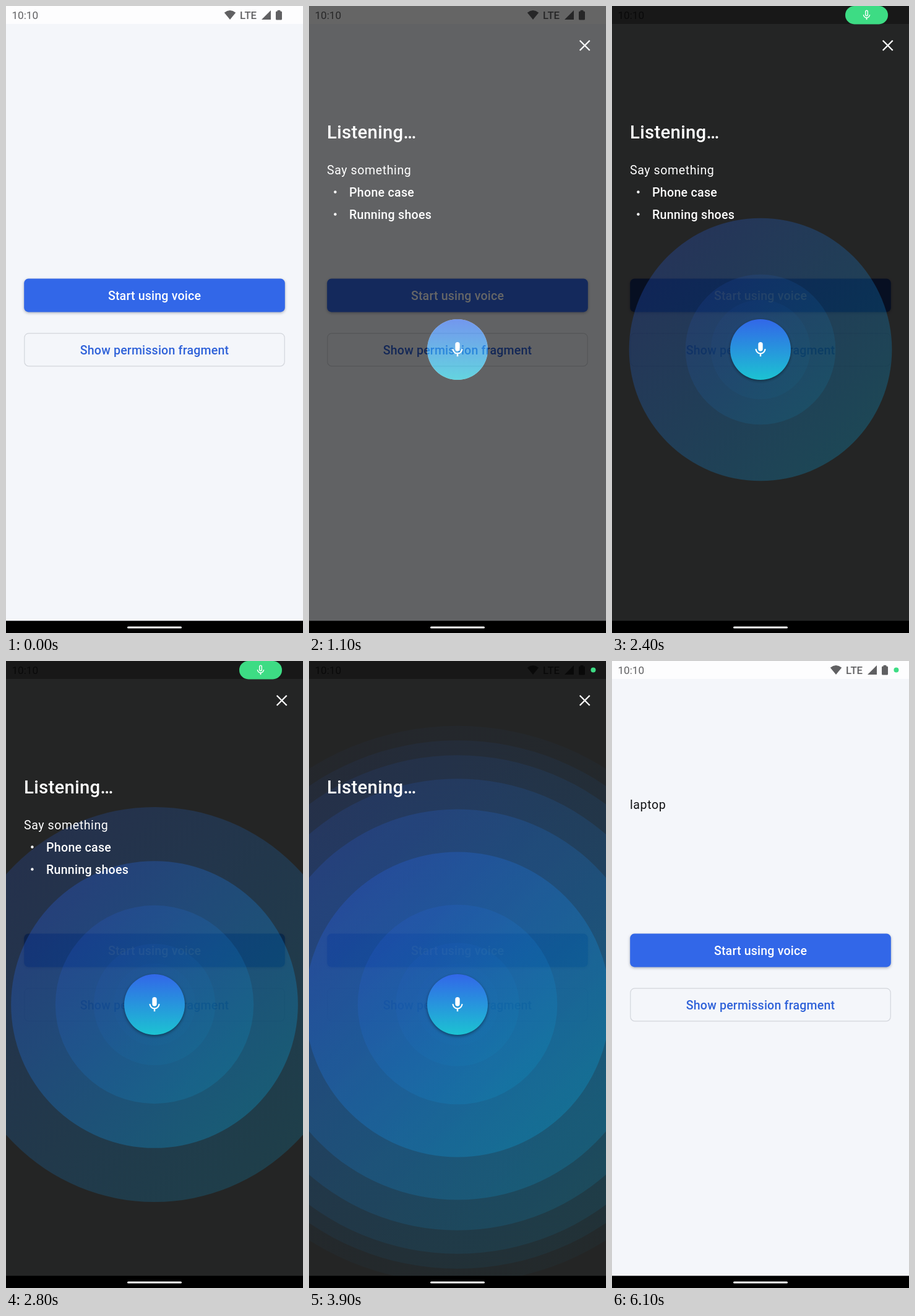
Recreate the animation shown at these times as an HTML page with a canvas. Size 480 px wide and 1013 px high, loop 6200 ms.

```html
<!DOCTYPE html>
<html lang="en">
<head>
<meta charset="utf-8">
<title>Voice input overlay</title>
<style>
  html, body { margin: 0; width: 100%; height: 100%; overflow: hidden; background: #000; }
  canvas { display: block; width: 480px; height: 1013px; }
</style>
</head>
<body>
<canvas id="stage"></canvas>
<script>
const W = 480, H = 1013, LOOP = 6200, STEP = 100;
const BLUE = '#3267e8', PAPER = '#f4f6fa', GREEN = '#3ddc84', GREY = '#606062';
const MIC = { x: 240, y: 555, r: 49 };
const RING_LIFE = 3900, RING_GROWTH = 430;
const RING_STARTS = [1212, 1547, 1790, 2068, 2328, 2597, 2886, 3159, 3430, 3700, 3970];

const canvas = document.getElementById('stage');
const ctx = canvas.getContext('2d');
const dpr = window.devicePixelRatio || 1;
canvas.width = W * dpr;
canvas.height = H * dpr;

const ramp = (t, a, b) => Math.min(1, Math.max(0, (t - a) / (b - a)));
const mix = (a, b, k) => a + (b - a) * k;
const smooth = k => k * k * (3 - 2 * k);

// cubic-bezier(.4, 0, .2, 1), solved by bisection
function fastOutSlowIn(x) {
  let lo = 0, hi = 1;
  for (let i = 0; i < 24; i++) {
    const s = (lo + hi) / 2, q = 1 - s;
    if (1.2 * q * q * s + 0.6 * q * s * s + s * s * s < x) lo = s; else hi = s;
  }
  return smooth(lo);
}

function text(str, x, y, { size = 19.56, weight = 400, color = '#fff', gap = 0, align = 'left' } = {}) {
  ctx.font = `${weight} ${size}px Roboto, sans-serif`;
  ctx.letterSpacing = gap + 'px';
  ctx.textAlign = align;
  ctx.fillStyle = color;
  ctx.fillText(str, x, y);
}

function disc(x, y, r, fill) {
  ctx.beginPath();
  ctx.arc(x, y, r, 0, Math.PI * 2);
  ctx.fillStyle = fill;
  ctx.fill();
}

function box(x, y, w, h, r) {
  ctx.beginPath();
  ctx.roundRect(x, y, w, h, r);
}

function poly(points, fill) {
  ctx.beginPath();
  points.forEach(([x, y]) => ctx.lineTo(x, y));
  ctx.closePath();
  ctx.fillStyle = fill;
  ctx.fill();
}

function withAlpha(alpha, draw) {
  ctx.save();
  ctx.globalAlpha *= alpha;
  draw();
  ctx.restore();
}

// Microphone on a 24 unit grid
function micIcon(x, y, scale, outlined) {
  ctx.save();
  ctx.translate(x, y);
  ctx.scale(scale, scale);
  ctx.translate(-12, -12);
  ctx.fillStyle = ctx.strokeStyle = '#fff';
  ctx.lineWidth = 1.7;
  if (outlined) {
    box(9.8, 2.8, 4.4, 10.4, 2.2);
    ctx.stroke();
  } else {
    box(9, 2, 6, 12, 3);
    ctx.fill();
  }
  ctx.beginPath();
  ctx.arc(12, 11, 6.15, 0, Math.PI);
  ctx.stroke();
  ctx.fillRect(11, 17, 2, 4);
  ctx.restore();
}

function outlineButton() {
  box(29.8, 528.8, 420.4, 53, 7);
  ctx.strokeStyle = '#d3d6dc';
  ctx.lineWidth = 1.2;
  ctx.stroke();
  text('Show permission fragment', 240, 563, { weight: 500, color: '#2f62d9', gap: 0.2, align: 'center' });
}

function filledButton() {
  ctx.save();
  ctx.shadowColor = 'rgba(30,40,70,.35)';
  ctx.shadowBlur = 4 * dpr;
  ctx.shadowOffsetY = 1.5 * dpr;
  box(29.2, 440.6, 421.6, 53.8, 7);
  ctx.fillStyle = BLUE;
  ctx.fill();
  ctx.restore();
  text('Start using voice', 240, 475, { weight: 500, gap: 0.2, align: 'center' });
}

function statusIcons() {
  ctx.beginPath();
  ctx.moveTo(362, 22);
  ctx.lineTo(352.8, 10.8);
  ctx.quadraticCurveTo(362, 3.4, 371.2, 10.8);
  ctx.closePath();
  ctx.fillStyle = GREY;
  ctx.fill();
  text('LTE', 378, 20.6, { size: 16.8, weight: 500, color: GREY });
  poly([[428, 7], [428, 22], [413, 22]], GREY);
  box(436, 8.5, 10, 14, 1.5);
  ctx.fill();
  ctx.fillRect(438.7, 6.8, 4.6, 2.5);
}

function page(t) {
  ctx.fillStyle = PAPER;
  ctx.fillRect(0, 0, W, H);
  ctx.fillStyle = '#fdfdfe';
  ctx.fillRect(0, 0, W, 29);
  text('10:10', 9.5, 21.3, { size: 17.1, color: GREY });
  if (t < 1700 || t >= 3000) statusIcons();
  if (t >= 4350) text('laptop', 29, 239, { color: '#111214', gap: 0.6 });
  filledButton();
  outlineButton();
}

function rings(t) {
  for (const start of RING_STARTS) {
    const p = (t - start) / RING_LIFE;
    if (p <= 0 || p >= 1) continue;
    const grow = fastOutSlowIn(p);
    const r = MIC.r + RING_GROWTH * grow, d = r * 0.7;
    const fill = ctx.createLinearGradient(MIC.x - d, MIC.y - d, MIC.x + d, MIC.y + d);
    fill.addColorStop(0, 'rgb(40,95,225)');
    fill.addColorStop(1, 'rgb(10,160,215)');
    withAlpha(Math.min(0.72 * grow, 0.56 * (1 - grow)), () => disc(MIC.x, MIC.y, r, fill));
  }
}

function micButton(shown) {
  const { x, y, r } = MIC;
  if (shown < 1) {
    // the page shines through while the button fades in
    withAlpha(Math.min(1, shown * 1.6), () => {
      disc(x, y, r, PAPER);
      ctx.clip();
      outlineButton();
    });
  }
  const fill = ctx.createLinearGradient(0, y - r, 0, y + r);
  fill.addColorStop(0, BLUE);
  fill.addColorStop(1, '#1cc3d2');
  withAlpha(shown, () => {
    if (shown === 1) {
      ctx.shadowColor = 'rgba(0,0,0,.4)';
      ctx.shadowBlur = 5 * dpr;
      ctx.shadowOffsetY = 2 * dpr;
    }
    disc(x, y, r, fill);
  });
  withAlpha(Math.min(1, shown * 1.5), () => micIcon(x, 555.2, 1.222));
}

function closeIcon() {
  ctx.beginPath();
  for (const s of [-1, 1]) {
    ctx.moveTo(445.7 - 8, 63.7 - 8 * s);
    ctx.lineTo(445.7 + 8, 63.7 + 8 * s);
  }
  ctx.strokeStyle = '#fff';
  ctx.lineWidth = 2.3;
  ctx.stroke();
}

function prompts(t) {
  text('Listening…', 29, 213.5, { size: 29.33, weight: 500, gap: 0.3 });
  if (t >= 3700) return;
  text('Say something', 29, 271.5, { gap: 0.6 });
  ['Phone case', 'Running shoes'].forEach((item, i) => {
    disc(42.4, 300.5 + 36 * i, 2.2, '#fff');
    text(item, 65, 307.5 + 36 * i, { weight: 500, gap: 0.3 });
  });
}

function overlay(t) {
  const dark = ramp(t, 1100, 1400);
  ctx.fillStyle = `rgba(0,0,0,${0.6 * ramp(t, 900, 1100) + 0.25 * dark})`;
  ctx.fillRect(0, 0, W, H);
  ctx.fillStyle = `rgba(0,0,0,${0.37 * dark})`;
  ctx.fillRect(0, 0, W, 29);
  rings(t);
  withAlpha(ramp(t, 900, 1100), () => {
    closeIcon();
    prompts(t);
  });
  micButton(ramp(t, 900, 1200));
}

// Recording indicator: opens as a chip, then shrinks to a dot
function indicator(t) {
  if (t < 1700) return;
  const open = smooth(t < 2500 ? ramp(t, 1600, 2000) : 1 - ramp(t, 2800, 3100));
  const left = mix(455.4, 377, open), right = mix(463.4, 446, open);
  const top = mix(10.6, 0, open), bottom = mix(18.6, 29.4, open);
  box(left, top, right - left, bottom - top, (bottom - top) / 2);
  ctx.fillStyle = GREEN;
  ctx.fill();
  if (open > 0.5) {
    withAlpha(open * 2 - 1, () => micIcon((left + right) / 2, 14.8, 0.82, true));
  }
}

function navBar() {
  ctx.fillStyle = '#000';
  ctx.fillRect(0, 993.3, W, 20);
  box(196, 1002.4, 88, 3, 1.5);
  ctx.fillStyle = '#fff';
  ctx.fill();
}

function draw(t) {
  ctx.setTransform(dpr, 0, 0, dpr, 0, 0);
  page(t);
  if (t > 900 && t < 4400) withAlpha(1 - ramp(t, 4250, 4400), () => overlay(t));
  indicator(t);
  navBar();
}

const begin = performance.now();
function tick() {
  const t = (performance.now() - begin) % LOOP;
  draw(Math.floor(t / STEP) * STEP);
  requestAnimationFrame(tick);
}
tick();
</script>
</body>
</html>
```
